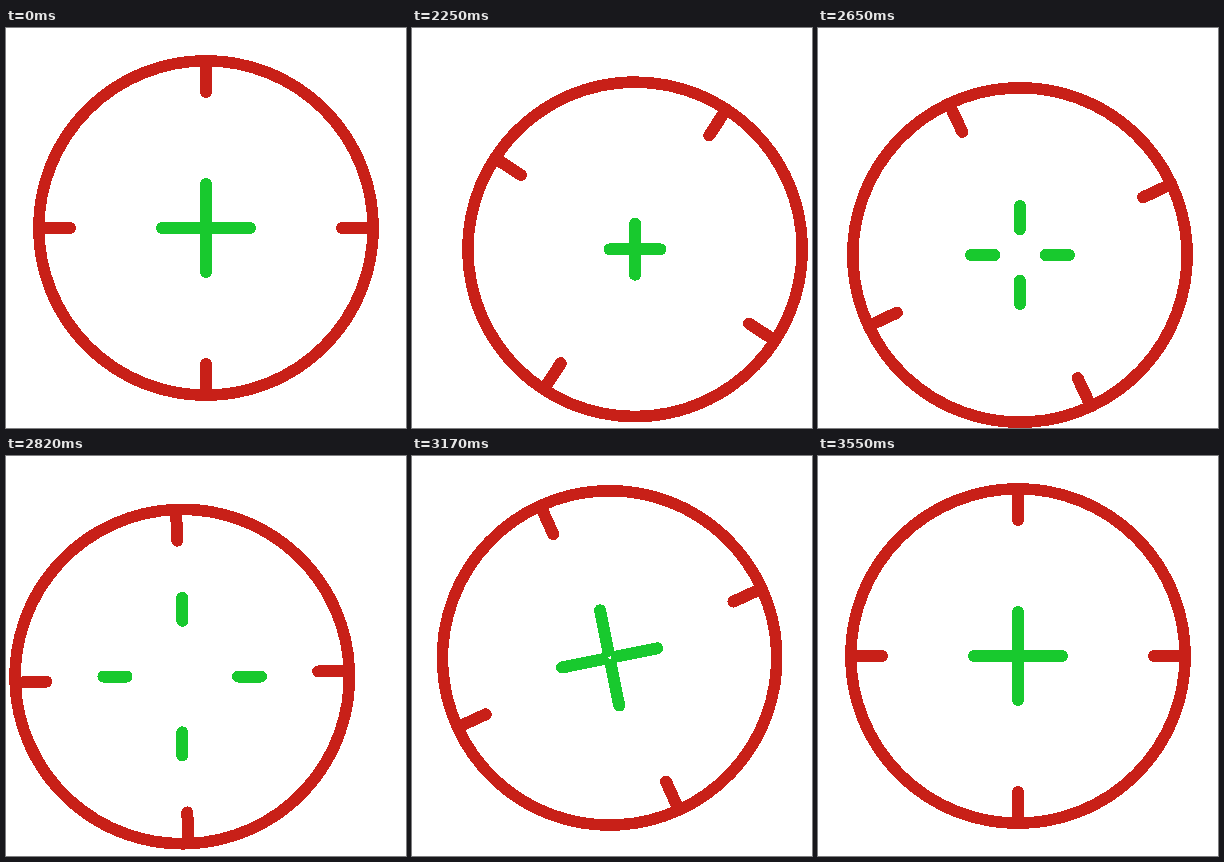
These frames come from a looping animation (400 px wide and 400 px high, 3570 ms). An HTML page:

```html
<!DOCTYPE html>
<html lang="en">
<head>
<meta charset="utf-8">
<title>Crosshair</title>
<style>
  html, body { margin: 0; width: 100%; height: 100%; overflow: hidden; background: #fff; }
  svg { display: block; width: 100%; height: 100%; }
  g { fill: none; stroke-width: 12; stroke-linecap: round; shape-rendering: crispEdges; }
  circle { stroke-width: 11.6; }
  #ring { stroke: #c82018; }
  #plus { stroke: #18c92e; }
</style>
</head>
<body>
<svg viewBox="0 0 400 400">
  <g id="ring">
    <circle r="167.2"/>
    <path d="M136 0H167M-136 0H-167M0 136V167M0-136V-167"/>
  </g>
  <g id="plus"><path id="arms"/></g>
</svg>
<script>
const LOOP = 3570, START = 2020;

const easeOut = (p, n) => 1 - (1 - p) ** n;
const easeInOut = (p, n) => p < .5 ? (2 * p) ** n / 2 : 1 - (2 - 2 * p) ** n / 2;

// The sight darts down right, swings left in an arc, then snaps home.
function pose(t) {
  const move = (start, span, ease, n) => ease(Math.min(1, Math.max(0, (t - start) / span)), n);
  const dart = n => move(2000, 300, easeOut, n);
  const swing = move(2408, 500, easeInOut, 3);
  const home = move(2928, 340, easeInOut, 3);
  return {
    x: 200 + 24.2 * dart(1.7) - 49 * swing + 24.8 * home,
    y: 200 + 22.4 * dart(1.7) - 2.4 * swing + 23 * swing * (1 - swing) - 20 * home,
    spin: 35.5 * dart(1.5) + 54.5 * move(2390, 500, easeInOut, 2) + 90 * move(2802, 645, easeInOut, 4),
    turn: 90 * move(2850, 468, easeInOut, 3),
    gap: 57 * (swing - move(2820, 510, easeInOut, 3)),
    len: 44 - 21 * (dart(1.2) - move(2797, 540, easeInOut, 3))
  };
}

const [ring, plus, arms] = ["ring", "plus", "arms"].map(id => document.getElementById(id));
const place = (el, x, y, angle) => el.setAttribute("transform", `translate(${x} ${y}) rotate(${angle})`);

function draw(now) {
  const t = now % LOOP;
  const { x, y, spin, turn, gap, len } = pose(t < START ? 0 : t);
  const tip = gap + len;
  place(ring, x, y, spin);
  place(plus, x, y, turn);
  arms.setAttribute("d", `M${gap} 0H${tip}M${-gap} 0H${-tip}M0 ${gap}V${tip}M0 ${-gap}V${-tip}`);
}

let begin;
function tick(now) {
  begin ??= now;
  draw(now - begin);
  requestAnimationFrame(tick);
}
draw(0);
requestAnimationFrame(tick);
</script>
</body>
</html>
```
